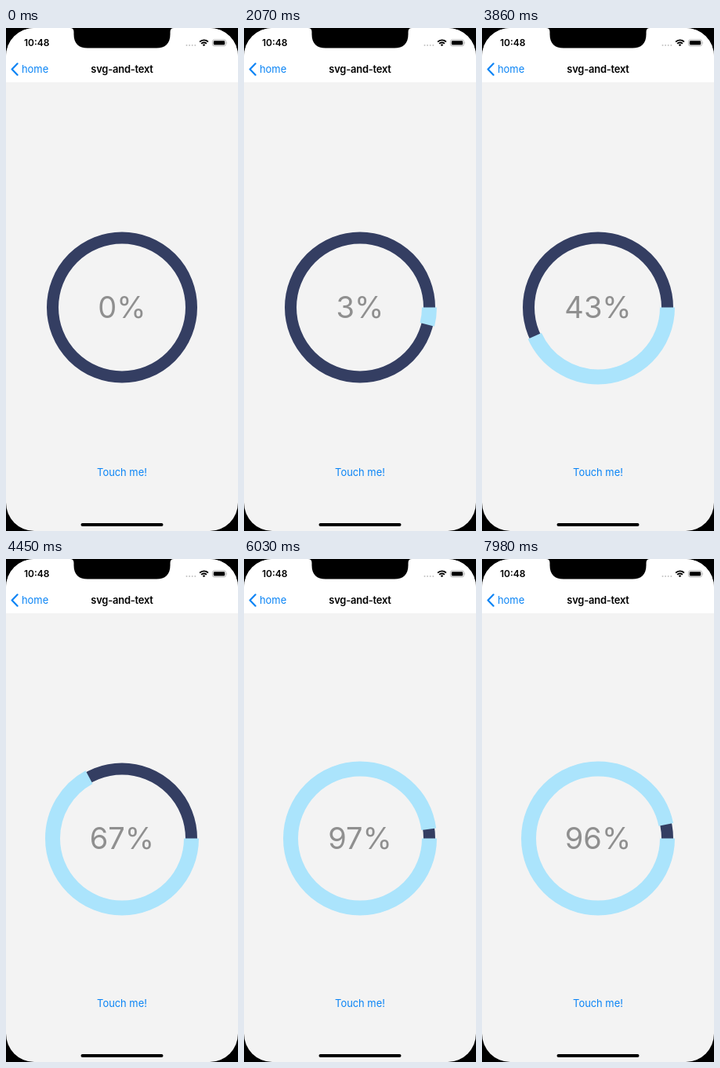
Write an HTML page that moves like this. It is 296 px wide and 640 px high and loops after 8 s.

```html
<!DOCTYPE html>
<html lang="en">
<head>
<meta charset="utf-8">
<title>svg-and-text</title>
<style>
  html, body { margin: 0; width: 100%; height: 100%; overflow: hidden; background: #000; }
  svg { display: block; width: 100%; height: 100%; }
  text { font-family: Inter, Roboto, sans-serif; font-size: 12.9px; }
  .mid { text-anchor: middle; }
  .bold { font-weight: 600; }
  .link { fill: #0a84f5; }
</style>
</head>
<body>
<svg viewBox="0 0 296 640">
  <defs>
    <clipPath id="screen"><rect width="296" height="640" rx="36"/></clipPath>
  </defs>
  <rect width="296" height="640"/>
  <g clip-path="url(#screen)">
    <rect width="296" height="640" fill="#f3f3f3"/>
    <rect width="296" height="69" fill="#fff"/>
  </g>

  <!-- status bar -->
  <path d="M82 0Q86.5 0 86.5 5V8C86.5 20 93 25.5 104 25.5H192C203 25.5 209.5 20 209.5 8V5Q209.5 0 214 0Z"/>
  <text class="bold" x="23" y="23" style="font-size:12px">10:48</text>
  <path d="M230.5 22H242" stroke="#c4c4c4" stroke-width="2" stroke-linecap="round" stroke-dasharray="0 3.6"/>
  <g fill="none" stroke="#000" stroke-width="1.8">
    <path d="M247.1 17.6A7.6 7.6 0 0 1 257.9 17.6"/>
    <path d="M249.1 19.9A4.8 4.8 0 0 1 255.9 19.9"/>
  </g>
  <path d="M250.7 21.3A2.6 2.6 0 0 1 254.3 21.3L252.5 23.2Z"/>
  <rect x="263.4" y="14.9" width="17.2" height="8" rx="2.4" fill="none" stroke="#a5a5a5" stroke-width=".8"/>
  <rect x="264.8" y="16.2" width="14.4" height="5.4" rx="1.3"/>
  <path d="M281.6 17.5Q283 18.9 281.6 20.3Z" fill="#a5a5a5"/>

  <!-- navigation -->
  <path d="M14.6 45.3L7.6 52.5L14.6 59.7" fill="none" stroke="#0a84f5" stroke-width="2.2" stroke-linecap="round" stroke-linejoin="round"/>
  <text class="link" x="20" y="57">home</text>
  <text class="mid bold" x="148" y="56.8" letter-spacing="-.2">svg-and-text</text>

  <!-- progress -->
  <g fill="none">
    <circle cx="148" cy="355.5" r="88.5" stroke="#343e62" stroke-width="15"/>
    <circle id="arc" cx="148" cy="355.5" r="88.5" stroke="#abe4fc" stroke-width="19" pathLength="100"/>
  </g>
  <text id="label" class="mid" x="148" y="368.5" fill="#8f8f8f" style="font-size:38px">0%</text>
  <text id="button" class="link mid" x="148" y="570">Touch me!</text>
  <rect x="95.5" y="630" width="105" height="4" rx="2"/>
</svg>
<script>
  const LOOP = 8000, DURATION = 5255;
  const [arc, label, button] = ['arc', 'label', 'button'].map(id => document.getElementById(id));

  const clamp = u => Math.min(1, Math.max(0, u));
  const easeInOut = u => u < .5 ? 2 * u * u : 1 - 2 * (1 - u) ** 2;
  const snap = (t, from, step) => from + Math.floor((t - from) / step + .001) * step;
  const ease = (t, start) => easeInOut(clamp((t - start) / DURATION));

  function progress(t) {
    if (t < 1490) return 0;
    if (t < 7190) return ease(Math.min(6480, snap(t, 1490, 113.4)), 1314);
    if (t < 7410) return 1;
    return 1 - ease(snap(t, 7410, 114), 7316);
  }

  // dimmed while held, then fades back
  function opacity(t, press, release) {
    if (t < press || t >= release + 115) return 1;
    return t < release ? .2 : .75;
  }

  function draw(t) {
    const p = progress(t) * 100;
    arc.setAttribute('stroke-dasharray', `${p} 200`);
    arc.style.display = p ? '' : 'none';
    label.textContent = Math.floor(p) + '%';
    button.setAttribute('opacity', Math.min(opacity(t, 1260, 1490), opacity(t, 7190, 7410)));
  }

  const start = performance.now();
  function tick() {
    draw((performance.now() - start) % LOOP);
    requestAnimationFrame(tick);
  }
  tick();
</script>
</body>
</html>
```
